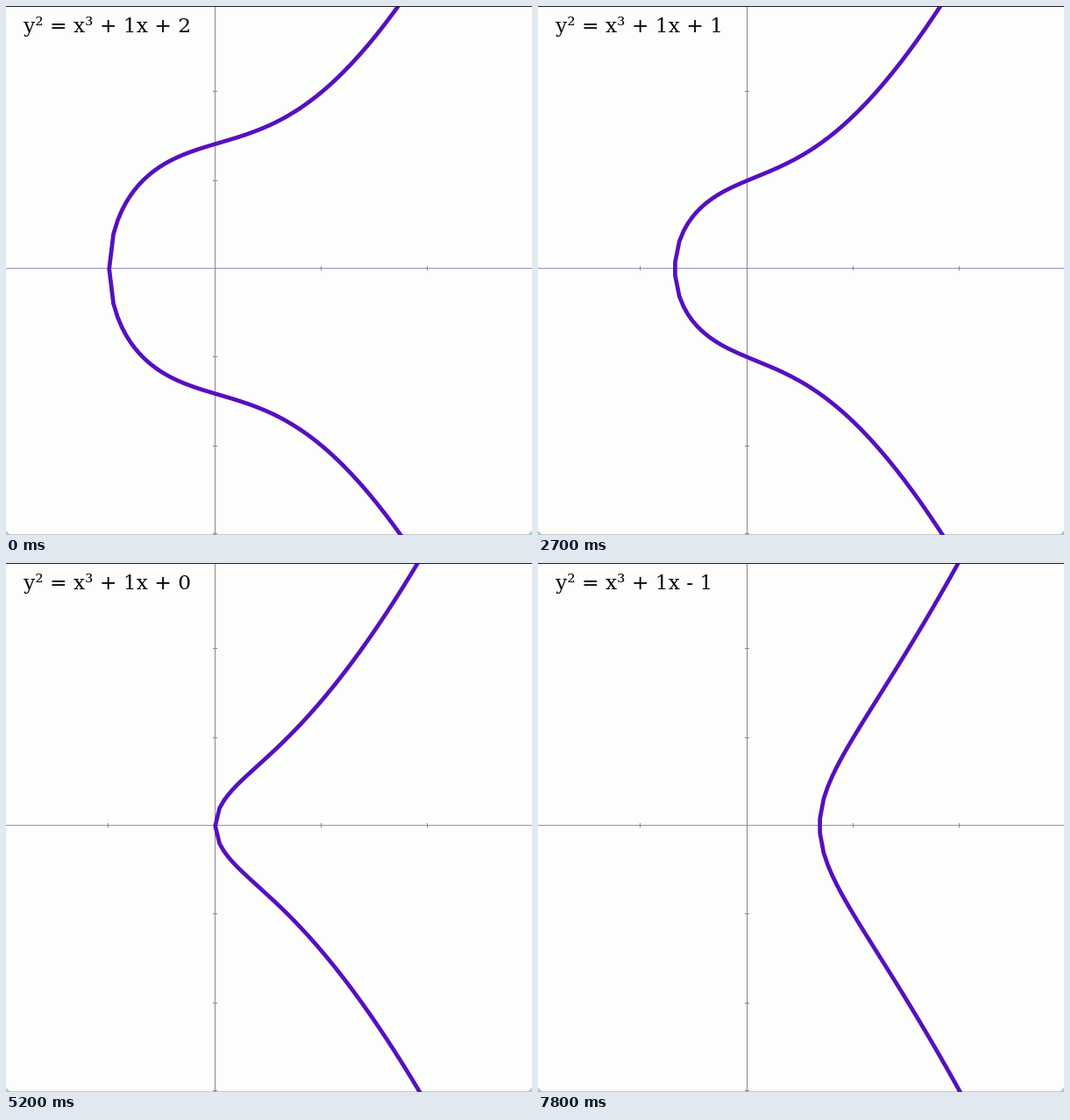
Recreate the animation shown at these times as a matplotlib script. Size 600x604 px, loop 8000 ms.

```python
import numpy as np
import matplotlib.pyplot as plt
from matplotlib.animation import FuncAnimation

W, H, DPI = 600, 604, 100
PT = 72 / DPI              # points per pixel
STEP, LOOP = 100, 8000     # ms
PAPER, INK, PURPLE = "#fdfdfb", "#080808", "#5510c0"
LILAC, GREY = "#9a90be", "#868690"

AX, AY = 238.5, 299.5      # axes crossing
CX, CY = 238.7, 300.1      # centre of the curve
UX, UY = 121, 100.8        # pixels per unit
MORPH, VANISH = 550, 403   # durations in ms

# (text hidden, motion start, text shown, b before, b after)
MOVES = [(1700, 1688, 2700, 2, 1),
         (4300, 4260, 5200, 1, 0),
         (6900, 6795, 7800, 0, -1)]

xs = np.sort(np.append(np.arange(-50, 76) / 25, 0.685))


def ease(s):
    s = min(max(s, 0), 1)
    return 4 * s**3 if s < 0.5 else 1 - 4 * (1 - s)**3


def curve(b):
    sq = xs**3 + xs + b
    return np.sqrt(np.maximum(sq, 0)), sq >= 0


def morph(b0, b1, ms):
    """Blend two curves; points the new one lacks collapse onto the axis."""
    y0, _ = curve(b0)
    y1, kept = curve(b1)
    t = np.where(kept, ease(ms / MORPH), ease(ms / VANISH))
    y = y0 + (y1 - y0) * t
    return y, y > 1e-6


def label(b):
    return f"y² = x³ + 1x {'-' if b < 0 else '+'} {abs(b)}"


def state(ms):
    b = MOVES[0][3]
    for hide, start, show, b0, b1 in MOVES:
        if hide <= ms < show:
            return *morph(b0, b1, ms - start), ""
        if ms >= show:
            b = b1
    return *curve(b), label(b)


fig = plt.figure(figsize=(W / DPI, H / DPI), dpi=DPI, facecolor=PAPER)
ax = fig.add_axes([0, 0, 1, 1])
ax.set_xlim(0, W)
ax.set_ylim(H, 0)
ax.axis("off")


def rule(x0, y0, x1, y1, color, z=1):
    ax.plot([x0, x1], [y0, y1], color=color, lw=PT, zorder=z,
            solid_capstyle="butt", snap=False)


rule(0, 0.5, W, 0.5, "#222222", 4)
rule(0, 603.5, W, 603.5, "#c8c8cc")
for corner in (0, W):
    inner = abs(corner - 5)
    ax.fill([corner, inner, corner], [H, H, H - 5], color="#a9c8d0", lw=0)

rule(AX, 0, AX, H, GREY)
rule(0, AY, W, AY, LILAC, 2)
for x in (116.5, 359.5, 480.5):
    rule(x, AY - 2.5, x, AY + 2.5, GREY, 2)
for y in (97.5, 199.5, 400.5, 502.5, 602.5):
    rule(AX - 2.5, y, AX + 2.5, y, GREY)

line, = ax.plot([], [], color=PURPLE, lw=4.7 * PT, zorder=3,
                solid_joinstyle="round")
title = ax.text(20.5, 30, "", family="DejaVu Serif", size=23.4 * PT,
                color=INK, va="baseline", zorder=5)


def draw(i):
    y, on, text = state(i * STEP)
    px = CX + UX * xs[on]
    dy = UY * y[on]
    line.set_data(np.append(px[::-1], px),
                  CY + np.append(-dy[::-1], dy))
    title.set_text(text)
    return line, title


anim = FuncAnimation(fig, draw, frames=LOOP // STEP, interval=STEP,
                     repeat=True, repeat_delay=0)
plt.show()
```
